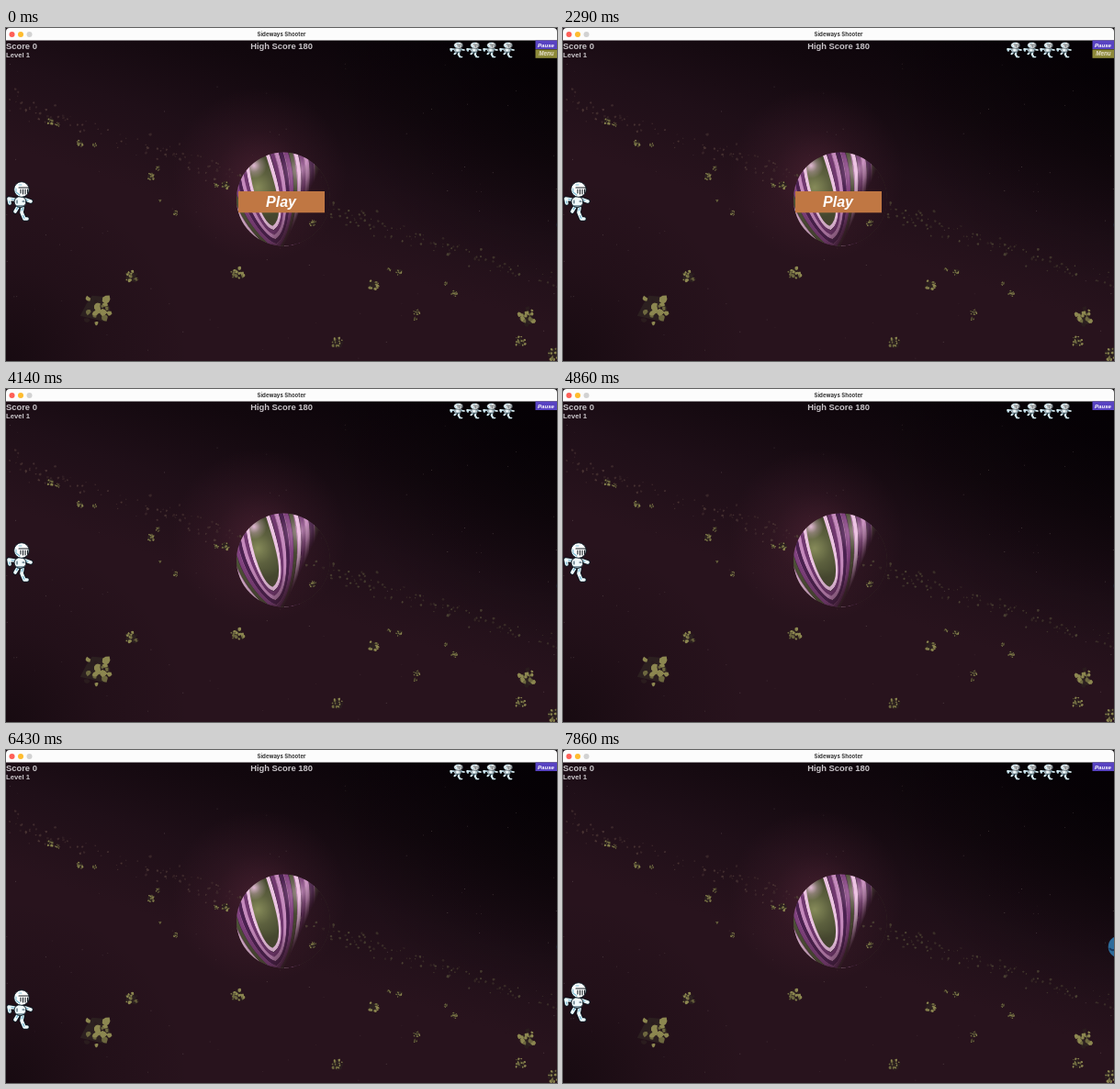
Write an HTML page with a canvas that moves like this. It is 600 px wide and 363 px high and loops after 8 s.

```html
<!DOCTYPE html>
<html lang="en">
<head>
<meta charset="utf-8">
<title>Sideways Shooter</title>
<style>
html, body { margin: 0; width: 100%; height: 100%; overflow: hidden; background: #10060b; }
canvas, svg { position: absolute; left: 0; top: 0; width: 600px; height: 363px; }
text { font-family: "Liberation Sans", Arial, sans-serif; font-weight: bold; fill: #c9c5c9; }
.title { font: 700 6px Inter, "Liberation Sans", sans-serif; fill: #333; }
.btn { font-style: italic; fill: #fff; }
.mid { text-anchor: middle; }
.start { animation: start 8s step-end infinite; }
.hero { animation: hero 8s infinite; }
.enemy { animation: enemy 8s infinite; }
@keyframes start {
  0% { visibility: visible; }
  32.08%, 100% { visibility: hidden; }
}
/* The hero moves about 18px per tick; a tick is 1/56 of the loop. */
@keyframes hero {
  0%, 64.22% { transform: translateY(0); animation-timing-function: steps(6); }
  74.94%, 78.51% { transform: translateY(111px); animation-timing-function: steps(1); }
  80.3%, 83.87% { transform: translateY(94px); animation-timing-function: steps(1); }
  85.65%, 91.01% { transform: translateY(116px); animation-timing-function: steps(1); }
  92.8%, 96.37% { transform: translateY(104px); animation-timing-function: steps(1); }
  98.15%, 100% { transform: translateY(86px); }
}
@keyframes enemy {
  0%, 91.01% { transform: translateX(6.4px); animation-timing-function: steps(4); }
  98.15%, 100% { transform: translateX(0); }
}
</style>
</head>
<body>
<canvas id="space" width="600" height="363"></canvas>
<canvas id="planet" width="600" height="363"></canvas>
<svg viewBox="0 0 600 363">
  <defs>
    <path id="limbs" d="M9 19L3 18 4 23M21 19L27 21M13 27L10 32M18 28L17 33 20 40 23 40"/>
    <g id="knight" stroke-linecap="round" stroke-linejoin="round" fill="none">
      <use href="#limbs" stroke="#0a1a24" stroke-width="5.2"/>
      <use href="#limbs" stroke="#eef9fb" stroke-width="3.6"/>
      <use href="#limbs" stroke="#6fb4d0" stroke-width="1.2" stroke-dasharray="3 6"/>
      <ellipse cx="15.5" cy="21.5" rx="6.5" ry="6" fill="#f1fafc" stroke="#0a1a24"/>
      <path d="M12 20V23M18 21H20M12 26H19" stroke="#16384a"/>
      <circle cx="17" cy="8" r="8.3" fill="#fff" stroke="#0a1a24" stroke-width=".9"/>
      <path d="M11 7V11L15 14M14 3H17" stroke="#78b9d0" stroke-width="1.1"/>
      <path d="M14 6H25M16 8V12M18.5 8V13M21 8V13M23.5 8V12" stroke="#121a20" stroke-width="1.1"/>
    </g>
  </defs>

  <path d="M0 13.5V4Q0 0 4 0H596Q600 0 600 4V13.5Z" fill="#fcfcfc"/>
  <circle cx="6.5" cy="7" r="3" fill="#fe5f57"/>
  <circle cx="16" cy="7" r="3" fill="#febc2e"/>
  <circle cx="25.5" cy="7" r="3" fill="#d2d2d2"/>
  <text class="title mid" x="300" y="9.2">Sideways Shooter</text>

  <text x="0" y="23.4" font-size="9.4">Score 0</text>
  <text x="0" y="31.8" font-size="7.7">Level 1</text>
  <text class="mid" x="300" y="23.4" font-size="9.4">High Score 180</text>

  <g id="lives"></g>

  <rect x="576.5" y="13.5" width="23.5" height="9.5" fill="#5843c2"/>
  <text class="btn mid" x="588" y="20.6" font-size="6.1">Pause</text>

  <g class="start">
    <rect x="576.5" y="23.4" width="23.5" height="9.4" fill="#8d8a3a"/>
    <text class="btn mid" x="588.5" y="30.4" font-size="6.3" style="fill:#e6dfcd">Menu</text>
    <rect x="253" y="178" width="94" height="23.3" fill="#c07743"/>
    <text class="btn mid" x="299.5" y="194.5" font-size="16">Play</text>
  </g>

  <g class="hero"><use href="#knight" y="168"/></g>

  <g class="enemy">
    <circle cx="605.7" cy="214.4" r="12" fill="#2d6c9b"/>
    <path d="M595 216Q598 220 602 217" fill="none" stroke="#17395f" stroke-width="2"/>
  </g>
</svg>
<script>
const context = id => document.getElementById(id).getContext('2d');
const c = context('space');
const p = context('planet');

let seed = 11;
const rnd = () => (seed = (seed * 16807) % 2147483647) / 2147483647;
const span = (a, b) => a + (b - a) * rnd();

// Fills the stage with evenly spaced gradient colours.
function wash(ctx, gradient, ...colors) {
  colors.forEach((color, i) => gradient.addColorStop(i / (colors.length - 1), color));
  ctx.fillStyle = gradient;
  ctx.fillRect(0, 0, 600, 363);
}

function glow(ctx, x, y, r, rgb, alpha) {
  wash(ctx, ctx.createRadialGradient(x, y, 0, x, y, r),
    `rgba(${rgb},${alpha})`, `rgba(${rgb},${alpha * .35})`, `rgba(${rgb},0)`);
}

function sky() {
  wash(c, c.createLinearGradient(440, 0, 330, 330),
    '#090308', '#12080e', '#1f0f18', '#28131d', '#28131d');
  glow(c, 600, 20, 260, '3,0,3', .7);
  glow(c, 0, 363, 200, '12,5,9', .6);
  glow(c, 276, 160, 95, '125,55,80', .35);
}

function stars() {
  for (let i = 0; i < 85; i++) {
    c.fillStyle = `rgba(165,150,145,${span(.1, .38)})`;
    c.fillRect(span(0, 600), span(36, 363), .9, .9);
  }
}

function blob(x, y, r, color) {
  c.beginPath();
  for (let i = 0; i < 7; i++) {
    const a = i * Math.PI * 2 / 7, d = r * span(.6, 1.15);
    c.lineTo(x + Math.cos(a) * d, y + Math.sin(a) * d);
  }
  c.fillStyle = color;
  c.fill();
}

// Sunlit chips scattered over a dark body.
function rock(x, y, r) {
  blob(x, y, r * .85, '#2c2020');
  for (let i = 0; i < 20; i++) {
    const a = span(0, 7), d = r * Math.sqrt(rnd()) * .85;
    blob(x + Math.cos(a) * d, y + Math.sin(a) * d, r * span(.1, .27),
      i % 4 ? (i % 3 ? '#8c8750' : '#6d683f') : '#2a1c1e');
  }
}

function belt() {
  for (let i = 0; i < 230; i++) {
    const x = span(0, 600), left = x < 250;
    const y = 78 + x * .335 + span(-1, 1) * span(2, 18);
    c.globalAlpha = span(.2, .75);
    blob(x, y, span(.6, 1.9), left ? '#56403c' : '#57513a');
  }
  c.globalAlpha = 1;
  const rocks = [
    [97, 306, 20], [137, 271, 9], [252, 268, 8.5], [400, 280, 6.5], [361, 343, 7],
    [567, 315, 11], [560, 342, 7], [597, 355, 8], [428, 266, 4.5], [447, 310, 4],
    [488, 289, 4], [158, 162, 5], [80, 126, 4.5], [48, 101, 5], [184, 202, 3.5],
    [334, 213, 4], [239, 171, 5]
  ];
  for (const [x, y, r] of rocks) {
    rock(x, y, r);
    if (r < 6) rock(x + span(-20, 20), y + span(-14, 8), r * .6);
  }
}

// One swirl band: down the left limb, round the bottom, up to the top edge.
function band(k, width, color) {
  const sx = 262 - 3 * k, sy = 146 + 5 * k;
  const bx = 291 + k, by = 218 + 5 * k;
  const ex = 283 + 5.2 * k, ey = 132;
  p.beginPath();
  p.moveTo(sx, sy);
  p.bezierCurveTo(sx + 4, sy + 35, bx - 13, by - 2, bx, by);
  p.bezierCurveTo(bx + 16, by - 10, ex + 14, ey + 42, ex, ey);
  p.lineWidth = width;
  p.strokeStyle = color;
  p.stroke();
}

function planet() {
  p.beginPath();
  p.arc(302, 186.5, 51, 0, 7);
  p.clip();
  p.fillStyle = '#474a30';
  p.fill();
  glow(p, 274, 174, 34, '150,155,100', .8);
  const colors = ['#ecc3e2', '#70386f', '#c58abd', '#4a2150', '#80427f', '#4d5336'];
  for (let k = 0; k < 10; k++) {
    band(k, 4.2, colors[k % 6]);
    band(k + .5, 1, k % 2 ? '#a765a2' : '#472149');
  }
  glow(p, 270, 150, 14, '240,195,228', .9);
  glow(p, 320, 155, 24, '240,195,228', .55);
  // The night side fades into the sky.
  p.globalCompositeOperation = 'destination-out';
  wash(p, p.createLinearGradient(303, 196, 319, 203.5), 'transparent', 'rgba(0,0,0,.35)', '#000');
  wash(p, p.createLinearGradient(280, 195, 266, 242), 'transparent', 'rgba(0,0,0,.45)');
}

sky();
stars();
belt();
planet();

document.getElementById('lives').innerHTML = [0, 1, 2, 3].map(i =>
  `<use href="#knight" transform="translate(${482.5 + 18 * i} 15.6) scale(.6 .4)"/>`).join('');
</script>
</body>
</html>
```
